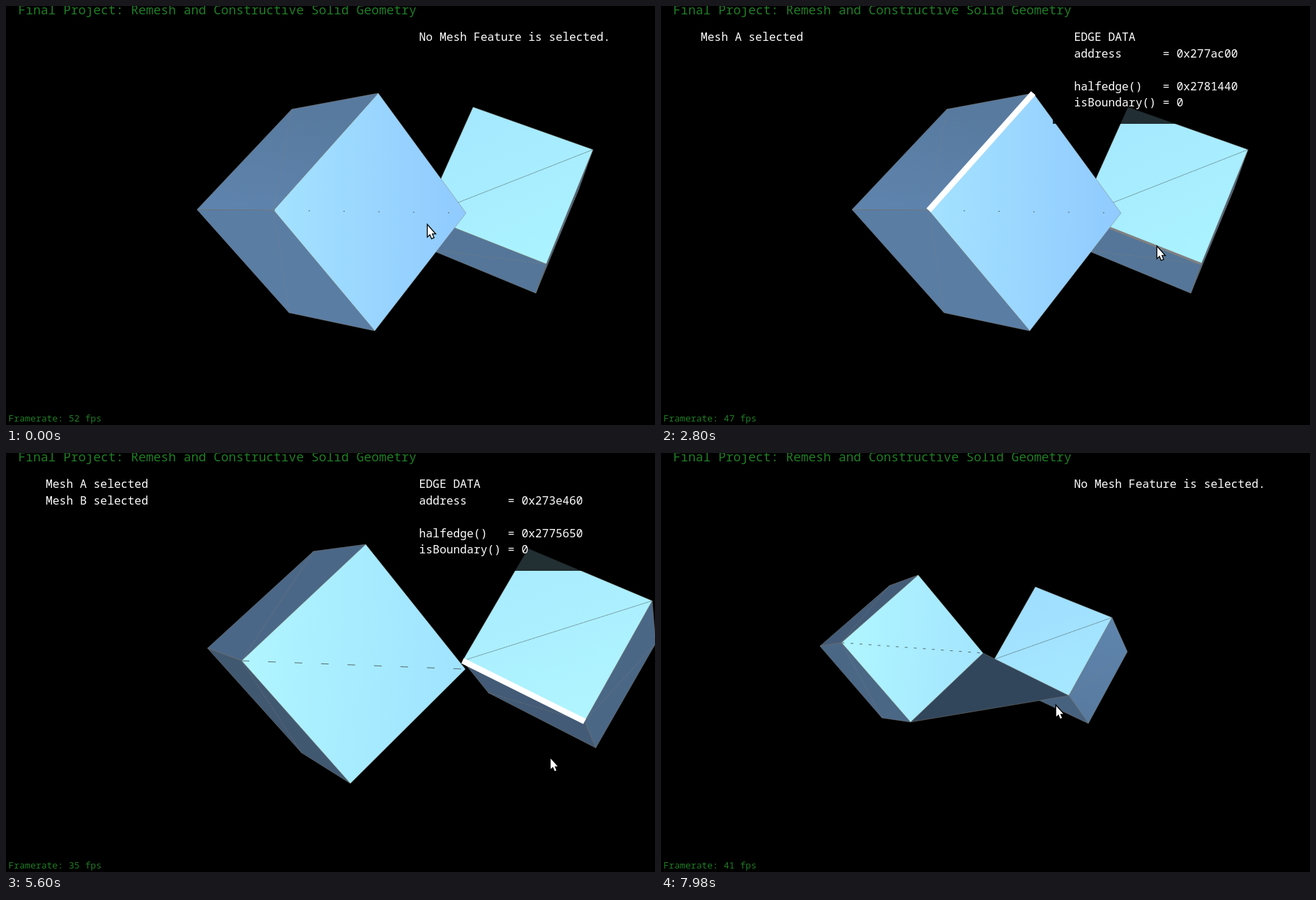
An HTML page with a canvas that plays this animation: 931x601 px, repeating every 8 s.

```html
<!DOCTYPE html>
<html lang="en">
<head>
<meta charset="utf-8">
<title>Remesh and Constructive Solid Geometry</title>
<style>
  html, body { margin: 0; width: 100%; height: 100%; overflow: hidden; background: #000; }
  canvas { position: absolute; left: 0; top: 0; }
  pre {
    position: absolute; margin: 0; color: #fff;
    font: 16.33px/23.6px "Noto Sans Mono", "DejaVu Sans Mono", monospace;
  }
  #title { left: 17.5px; top: -7.5px; font-size: 17.98px; line-height: 24px; color: #1f7d25; }
  #fps { left: 3.5px; top: 581px; font-size: 13.1px; line-height: 20px; color: #1f7d25; }
  #meshes { left: 57px; top: 33px; }
  #info { left: 592.5px; top: 33px; }
</style>
</head>
<body>
<canvas id="stage" width="931" height="601"></canvas>
<pre id="title">Final Project: Remesh and Constructive Solid Geometry</pre>
<pre id="meshes"></pre>
<pre id="info"></pre>
<pre id="fps"></pre>
<script>
const LOOP = 8000, STEP = 70;
const ctx = document.getElementById('stage').getContext('2d');

// Corners of a pose: cube A is 0-6 (top, left, bottom, right, then the back ones),
// cube B is 7-13 (top, right, bottom, left, then the back ones).
// Shades run from the first to the third corner of each face.
function pose(corners, shades, dash) {
  const n = corners.split(/[ ,]+/).map(Number);
  const pts = [];
  for (let i = 0; i < n.length; i += 2) pts.push([n[i], n[i + 1]]);
  const cols = shades.split(' ').map(h => [0, 2, 4].map(i => parseInt(h.substr(i, 2), 16)));
  return { pts, cols, dash };
}

// shade order: A front, A upper left, A lower left, B front, B bottom, B right, bridge
const start = pose(
  '534,125 384,293 529,466 660,297 410,148 274,292 406,440 ' +
  '670,145 842,206 775,370 600,301 610,350 760,412 822,262',
  'a4e2ff 90caff 587a9f 5e83ac 5a7da4 5a7da4 a5e8ff abf3ff 557698 557698 48617d 48617d 32465b 32465b',
  [2, 48]);
const turned = pose(
  '519,132 343,299 500,474 659,308 436,141 286,282 420,430 ' +
  '738,134 915,208 822,381 649,294 679,340 833,417 915,267',
  'aff4ff 9fe3ff 4d6b8c 4d6b8c 435b76 435b76 a7eaff b0f5ff 445d79 445d79 4a6482 4a6482 32465b 32465b',
  [16, 29]);
const settled = pose(
  '516,131 338,298 494,474 659,310 441,141 289,280 424,430 ' +
  '749,137 927,212 830,385 655,298 692,344 846,423 932,273',
  'b0f5ff 9fe3ff 4b6787 4b6787 415871 415871 a8ebff b0f5ff 435b76 435b76 4b6786 4b6786 32465b 32465b',
  [11, 27]);
const sideView = pose(
  '498,152 463,240 518,364 546,270 365,180 320,266 381,383 ' +
  '451,205 569,244 557,344 439,305 391,357 509,396 521,296',
  '5c81a9 5c81a9 6b95c2 6f9bca 9ad8ff 89c1fb 96d2ff 8ec9ff 74a0d0 74a0d0 40566f 40566f 34495e 34495e',
  [1, 60]);
const frontView = pose(
  '369,175 259,272 358,386 462,287 328,190 228,277 317,380 ' +
  '537,192 647,236 585,348 478,296 505,337 613,388 669,285',
  'b0f6ff a3e5ff 435b76 435b76 4a6786 4a6786 9fdeff a6e8ff 47627f 47627f 5f85ae 587a9f 32465b 32465b',
  [4, 9]);

const FACES = [[1, 0, 3, 2], [4, 0, 1, 5], [1, 2, 6, 5], [7, 8, 9, 10], [10, 9, 12, 11], [8, 9, 12, 13], [3, 2, 9]];
const DIAGONALS = [[1, 3], [4, 1], [1, 6], [10, 8], [11, 9], [13, 9]];

const CURSOR = [
  [0, 605, 315], [490, 605, 315], [560, 411, 287], [910, 411, 287], [980, 412, 287],
  [1190, 412, 287], [1400, 411, 266], [1680, 411, 266], [1820, 411, 264], [2100, 411, 264],
  [2170, 412, 265], [2240, 412, 265], [2800, 712, 346], [4270, 712, 346], [4550, 850, 470],
  [4900, 820, 464], [5040, 819, 464], [5320, 819, 464], [6160, 706, 387], [6370, 696, 378],
  [6510, 696, 378], [6650, 694, 377], [7070, 694, 377], [7490, 691, 342], [7980, 567, 363]
];
const FPS = [[0, 52], [840, 53], [1820, 47], [2940, 38], [3920, 36], [4900, 35], [5950, 32], [7140, 41]];

const lerp = (a, b, k) => a + (b - a) * k;
const part = (t, a, b) => Math.min(1, Math.max(0, (t - a) / (b - a)));

// Screen x of a point on a turntable; a zero angle is a plain blend.
function turn(a, b, k, angle) {
  if (!angle) return lerp(a, b, k);
  const mid = 465;
  return mid + ((a - mid) * Math.sin((1 - k) * angle) + (b - mid) * Math.sin(k * angle)) / Math.sin(angle);
}

function blend(p, q, k, angle) {
  const mix = (u, v) => u.map((n, i) => lerp(n, v[i], k));
  return {
    pts: p.pts.map((a, i) => [turn(a[0], q.pts[i][0], k, angle), lerp(a[1], q.pts[i][1], k)]),
    cols: p.cols.map((c, i) => mix(c, q.cols[i])),
    dash: mix(p.dash, q.dash)
  };
}

function poseAt(t) {
  if (t >= 6790) return blend(sideView, frontView, part(t, 7490, 7980), 1.05);
  if (t < 4900) return blend(start, turned, part(t, 4480, 4900), 0);
  return blend(turned, settled, part(t, 4900, 5040), 0);
}

function line(a, b, color, width, dash = []) {
  ctx.strokeStyle = color;
  ctx.lineWidth = width;
  ctx.setLineDash(dash);
  ctx.beginPath();
  ctx.moveTo(...a);
  ctx.lineTo(...b);
  ctx.stroke();
  ctx.setLineDash([]);
}

function face(p, id) {
  const pts = FACES[id].map(i => p.pts[i]);
  const fill = ctx.createLinearGradient(...pts[0], ...pts[2]);
  [0, 1].forEach(i => fill.addColorStop(i, `rgb(${p.cols[id * 2 + i].map(Math.round)})`));
  ctx.beginPath();
  pts.forEach(pt => ctx.lineTo(...pt));
  ctx.closePath();
  ctx.fillStyle = fill;
  ctx.fill();
  ctx.strokeStyle = 'rgba(130,125,115,.6)';
  ctx.lineWidth = 0.8;
  ctx.stroke();
  const d = DIAGONALS[id];
  if (!d) return;
  const ends = d.map(i => p.pts[i]);
  if (id === 0) line(...ends, '#54686c', 1, p.dash);
  else if (id === 3) line(...ends, '#4c5f64', 0.9, [1.5, 1]);
  else line(...ends, 'rgba(135,130,120,.7)', 0.8, [2, 2]);
}

function mark(p, a, b, selected) {
  line(p.pts[a], p.pts[b], selected ? '#fff' : '#808080', selected ? 8.5 : 3);
}

function drawCursor(t) {
  const i = Math.max(1, CURSOR.findIndex(c => c[0] >= t));
  const [a, b] = [CURSOR[i - 1], CURSOR[i]];
  const k = part(t, a[0], b[0]);
  ctx.save();
  ctx.translate(lerp(a[1], b[1], k), lerp(a[2], b[2], k));
  const arrow = new Path2D('M0 0V15L3.3 12L5.8 18L8.2 17L5.7 11.2H10Z');
  ctx.strokeStyle = '#000';
  ctx.lineWidth = 2.6;
  ctx.stroke(arrow);
  ctx.fillStyle = '#fff';
  ctx.fill(arrow);
  ctx.restore();
}

function drawScene(t) {
  const p = poseAt(t), merged = t >= 6790;
  ctx.fillStyle = '#000';
  ctx.fillRect(0, 0, 931, 601);
  [5, 4, 3].forEach(id => face(p, id));
  if (merged) face(p, 6);
  else if (t >= 2800) mark(p, 10, 9, t >= 3150);
  [1, 2, 0].forEach(id => face(p, id));
  if (t >= 560 && t < 1330) mark(p, 1, 3, false);
  if (t >= 1330 && t < 3150) mark(p, 1, 0, t >= 1610);
  if (t >= 1610 && !merged) {
    ctx.fillStyle = 'rgba(0,0,0,.8)';
    ctx.fillRect(562, 0, 369, 169);
  }
  drawCursor(t);
}

function setText(id, text) {
  const el = document.getElementById(id);
  if (el.textContent !== text) el.textContent = text;
}

function drawText(t) {
  const picked = t >= 1610 && t < 6790;
  const [address, half] = t < 3150 ? ['0x277ac00', '0x2781440'] : ['0x273e460', '0x2775650'];
  const row = (name, value) => name.padEnd(13) + '= ' + value;
  setText('info', picked
    ? ['EDGE DATA', row('address', address), '', row('halfedge()', half), row('isBoundary()', 0)].join('\n')
    : 'No Mesh Feature is selected.');
  const meshes = [];
  if (t >= 2310 && t < 6790) meshes.push('Mesh A selected');
  if (t >= 4130 && t < 6790) meshes.push('Mesh B selected');
  setText('meshes', meshes.join('\n'));
  setText('fps', `Framerate: ${FPS.filter(f => f[0] <= t).pop()[1]} fps`);
}

const begin = performance.now();
function tick() {
  const t = Math.floor((performance.now() - begin) % LOOP / STEP) * STEP;
  drawScene(t);
  drawText(t);
  requestAnimationFrame(tick);
}
tick();
</script>
</body>
</html>
```
